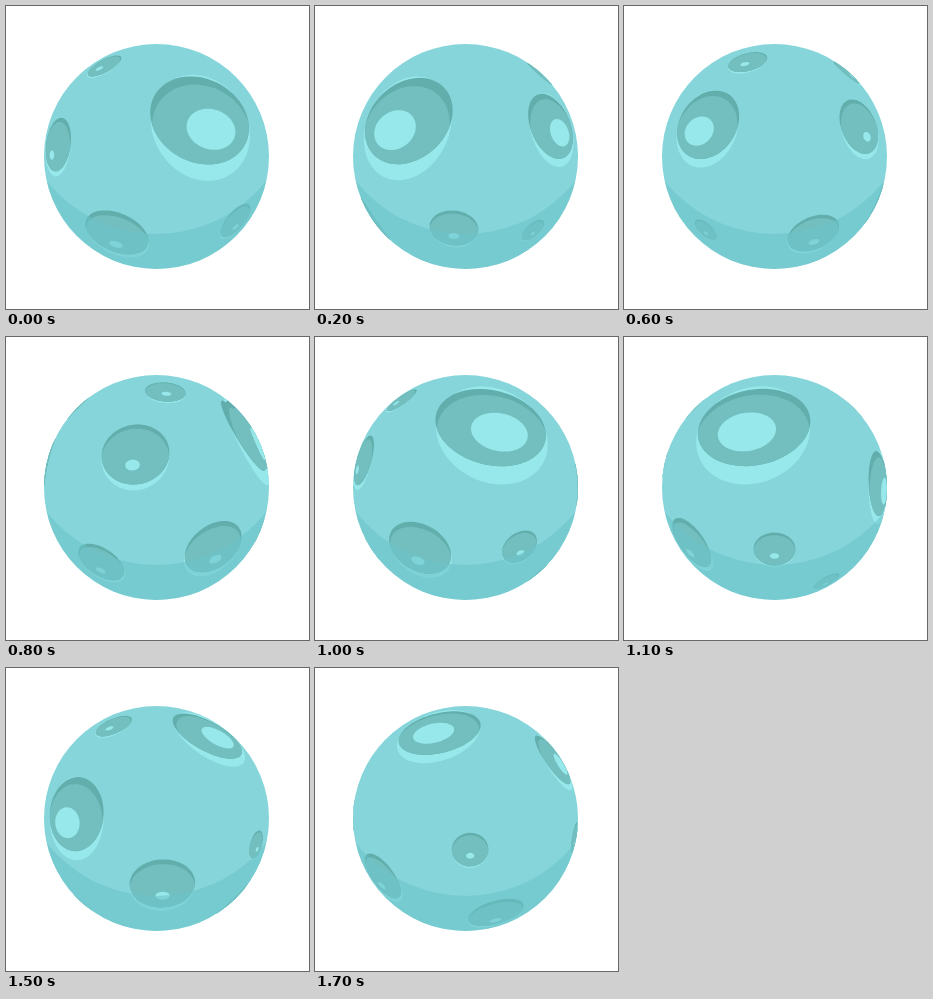
Recreate the animation shown at these times as an HTML page with a canvas. Size 303 by 303 pixels, loop 1800 ms.

```html
<!DOCTYPE html>
<html>
<head>
<meta charset="utf-8">
<title>Planet</title>
<style>
  html, body { margin: 0; height: 100%; overflow: hidden; background: #fff; }
  canvas { display: block; width: 100vw; height: 100vh; }
</style>
</head>
<body>
<canvas width="303" height="303"></canvas>
<script>
const ctx = document.querySelector('canvas').getContext('2d');
const { sin, cos, PI, hypot, floor } = Math;
const RAD = PI / 180;
const CENTER = 150.5, RADIUS = 112.5;
const CAMERA = 2.5, FOCAL = Math.sqrt(CAMERA * CAMERA - 1);
const LOOP = 1800, TICK = 100, TURN = 22.4;

// Angles are in degrees; positive latitudes lie below the equator.
const craters = [];
const addCrater = (lon, lat, size, ratio) => craters.push({ lon, lat, size, ratio });

// Small craters near the top, with gaps above the two largest ones.
for (let i = 0; i < 6; i++) {
  if (i % 3 !== 1) addCrater(64 * i - 30.5, -41, 8, .23);
}

// Large craters, evenly spaced: latitude, size.
[[-4, 12], [-12, 20.5], [-11, 15], [-11, 12], [-23, 22], [0, 16], [-37, 17], [-26, 14]]
  .forEach(([lat, size], i) => addCrater(65 * i - 46, lat, size, size > 12 ? .49 : .21));

// Lower craters, whose sizes rise and fall: longitude, latitude.
[[-19, 33], [40, 28], [78, 31], [130, 32], [182, 25], [224, 23],
 [256, 44], [316, 26], [376, 44], [360, 11], [418, 9]]
  .forEach(([lon, lat], i) => addCrater(lon, lat, 9.3 + 3.8 * cos(96 * i * RAD), .22));

function project(x, y, z) {
  // Points behind the horizon are pushed just outside it.
  const k = z > 1 / CAMERA ? FOCAL / (CAMERA - z) : 1.04 / hypot(x, y);
  return [CENTER + x * k * RADIUS, CENTER + y * k * RADIUS];
}

// Outline of an ellipse lying on the globe.
function ring(lon, lat, size, tall = 1) {
  const path = new Path2D();
  const sl = sin(lon * RAD), cl = cos(lon * RAD);
  const sp = sin(lat * RAD), cp = cos(lat * RAD);
  const depth = cos(size * RAD), reach = sin(size * RAD);
  for (let i = 0; i < 72; i++) {
    const east = reach * cos(i * PI / 36), south = reach * tall * sin(i * PI / 36);
    path.lineTo(...project(
      depth * cp * sl + east * cl - south * sp * sl,
      depth * sp + south * cp,
      depth * cp * cl - east * sl - south * sp * cl
    ));
  }
  path.closePath();
  return path;
}

function circle(x, y, r) {
  const path = new Path2D();
  path.arc(x, y, r, 0, 2 * PI);
  return path;
}

function fill(path, color, rule) {
  ctx.fillStyle = color;
  ctx.fill(path, rule);
}

function drawCrater(lon, { lat, size, ratio }) {
  const rim = .4 * size * size * RAD;
  const tall = 1 - rim / size;
  const side = sin(lon * RAD);
  const wall = ring(lon, lat - rim, size, tall);
  fill(ring(lon, lat, size), '#97e8eb');
  fill(wall, '#62aeac');
  ctx.save();
  ctx.clip(wall);
  fill(ring(lon + .4 * side * rim, lat + .3 * rim + .5, size, tall), '#73bfbf');
  fill(ring(lon + .25 * side * size, lat + size * (.42 - .65 * ratio), size * ratio, .75), '#97e8eb');
  ctx.restore();
}

function draw(turn) {
  const globe = circle(CENTER, CENTER, RADIUS);
  ctx.clearRect(0, 0, 303, 303);
  ctx.save();
  fill(globe, '#85d5da');
  ctx.clip(globe);
  for (const crater of craters) {
    const lon = crater.lon - turn;
    if (lon > -82 && lon < 82) drawCrater(lon, crater);
  }
  // Translucent shadow along the bottom, over the craters.
  const shadow = circle(CENTER, 88, 140);
  shadow.rect(-100, -100, 503, 503);
  fill(shadow, 'rgba(106, 195, 200, .55)', 'evenodd');
  ctx.restore();
}

function frame() {
  const tick = floor(performance.now() % LOOP / TICK);
  const step = tick < 5 ? tick : tick - 1; // one pose is held for two ticks
  draw(step * TURN);
  requestAnimationFrame(frame);
}
frame();
</script>
</body>
</html>
```
